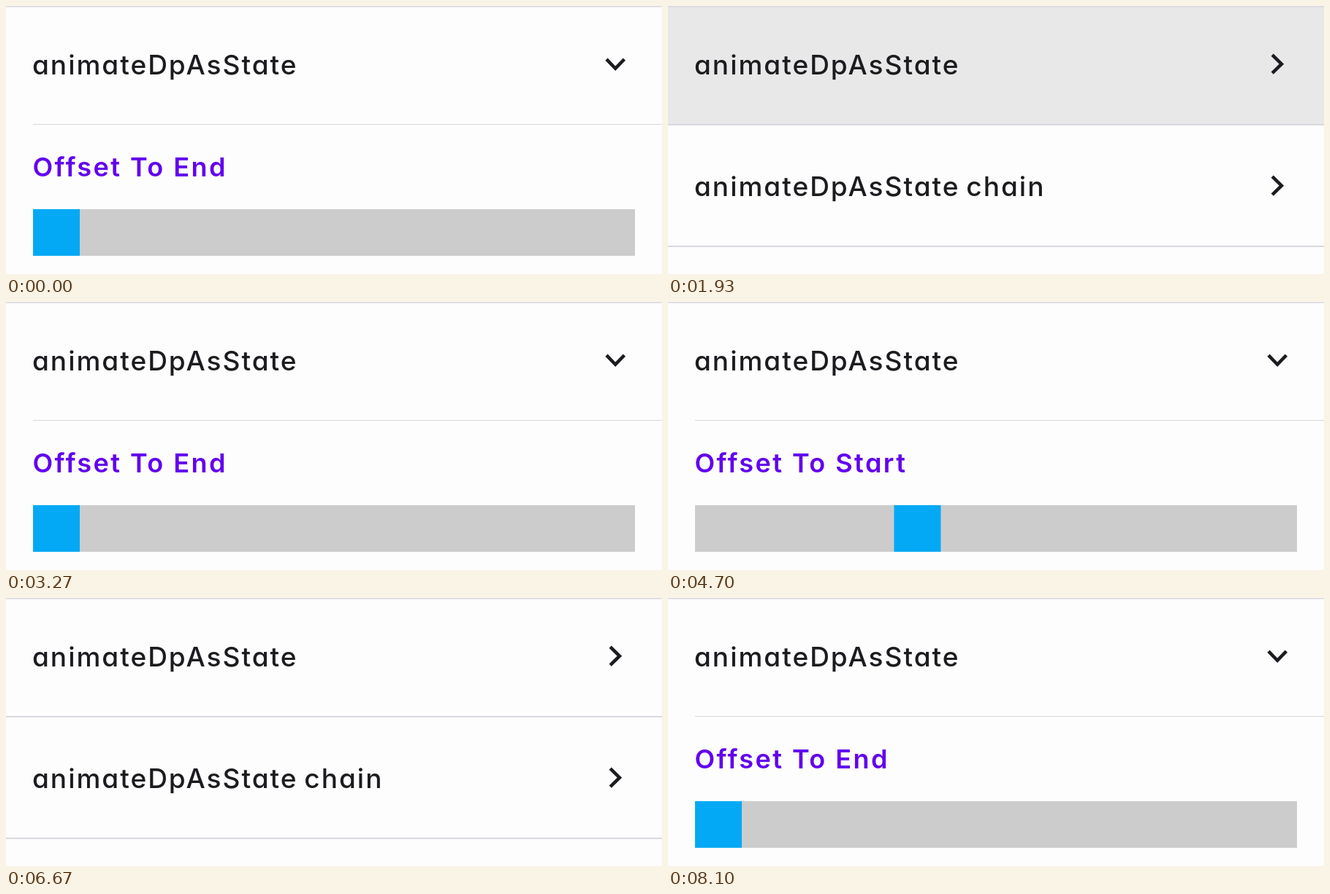
An HTML page for the animation above (8.13 s loop, 898 px wide and 368 px high).

```html
<!DOCTYPE html>
<html lang="en">
<head>
<meta charset="utf-8">
<title>animateDpAsState</title>
<style>
  html, body { margin: 0; width: 100%; height: 100%; overflow: hidden; background: #fdfdfd; }
  svg { display: block; width: 898px; height: 368px; }
  text { font-family: Inter, "Open Sans", sans-serif; font-feature-settings: "cv11"; }
  .title { font-size: 37px; font-weight: 500; letter-spacing: 2px; word-spacing: -3px; fill: #1c1b1f; }
  .label { font-size: 36px; font-weight: 600; letter-spacing: 2.45px; fill: #6200ee; }
  .chevron { fill: none; stroke: #1c1b1f; stroke-width: 4.6; }
  .line { fill: #d9d9e0; }
</style>
</head>
<body>
<svg viewBox="0 0 898 368">
  <defs>
    <clipPath id="header"><rect width="898" height="163"/></clipPath>
  </defs>
  <rect width="898" height="368" fill="#fdfdfd"/>
  <circle id="ripple" cx="449" cy="81" fill="#e3e3e4" clip-path="url(#header)"/>
  <rect class="line" width="898" height="1.5"/>
  <text class="title" x="36" y="93.5">animateDpAsState</text>

  <g id="collapsed">
    <path class="chevron" d="M827.2 67.2 839.9 79.7 827.2 92.2"/>
    <rect class="line" y="162" width="898" height="2"/>
    <text class="title" x="36" y="260.5">animateDpAsState chain</text>
    <path class="chevron" d="M827.2 234.2 839.9 246.7 827.2 259.2"/>
    <rect class="line" y="329" width="898" height="2"/>
  </g>

  <g id="expanded">
    <path class="chevron" d="M822 73.2 834.2 85.8 846.4 73.2"/>
    <rect class="line" x="37" y="162" width="861" height="1.2"/>
    <text id="label" class="label" x="36.5" y="234"></text>
    <rect x="37" y="279" width="824" height="64" fill="#ccc"/>
    <rect id="box" y="279" width="64" height="64" fill="#03a9f4"/>
  </g>
</svg>
<script>
const LOOP = 8130;
const TAP_DELAY = 100;
const START_X = 37, END_X = 797;
const SPRING = Math.sqrt(200) / 1000;

// Each cycle: move the box, collapse the row, expand it again.
const cycles = [
  { move: 1072, collapse: 1760, expand: 2860 },
  { move: 4612, collapse: 5390, expand: 7000 }
];

const el = Object.fromEntries(
  ["ripple", "collapsed", "expanded", "label", "box"].map(id => [id, document.getElementById(id)])
);
const clamp = v => Math.min(1, Math.max(0, v));
const show = (node, on) => node.setAttribute("display", on ? "inline" : "none");

// Critically damped spring, 0 to 1
const spring = t => t <= 0 ? 0 : 1 - (1 + SPRING * t) * Math.exp(-SPRING * t);

function drawRipple(t) {
  const presses = cycles.flatMap(c => [c.collapse - TAP_DELAY, c.expand - TAP_DELAY]);
  const age = t - (presses.filter(p => p <= t).pop() ?? -LOOP);
  const grow = 1 - (1 - clamp(age / 225)) ** 2;
  el.ripple.setAttribute("r", 140 + 330 * grow);
  el.ripple.setAttribute("opacity", clamp(age / 75) * (1 - clamp((age - 240) / 150)));
}

function draw(t) {
  const active = cycles.find(c => t >= c.move && t < c.expand);
  const collapsed = Boolean(active && t >= active.collapse);
  const progress = active ? spring(t - active.move) : 0;

  show(el.collapsed, collapsed);
  show(el.expanded, !collapsed);
  el.label.textContent = active ? "Offset To Start" : "Offset To End";
  el.box.setAttribute("x", START_X + (END_X - START_X) * progress);
  drawRipple(t);
}

const start = performance.now();
function tick() {
  draw((performance.now() - start) % LOOP);
  requestAnimationFrame(tick);
}
tick();
</script>
</body>
</html>
```
